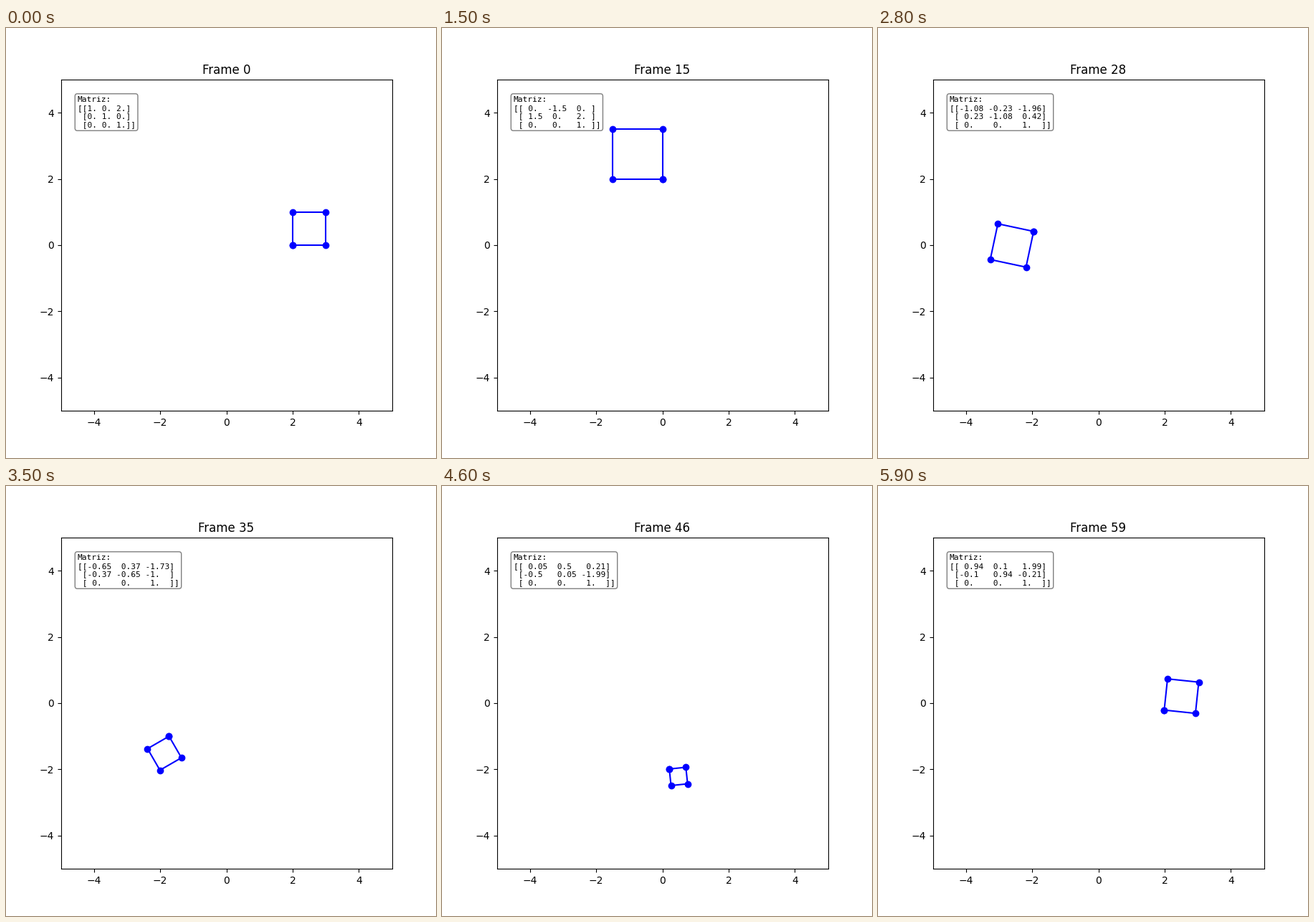
Write a matplotlib script that moves like this. It is 600 by 600 pixels and loops after 6000 ms.

```python
import numpy as np
import matplotlib.pyplot as plt
from matplotlib.animation import FuncAnimation

FRAMES = 60
INTERVAL = 100

# Closed unit square in homogeneous coordinates, one corner per column
SQUARE = np.array([
    [0, 1, 1, 0, 0],
    [0, 0, 1, 1, 0],
    [1, 1, 1, 1, 1],
])


def translation(tx, ty):
    return np.array([[1, 0, tx], [0, 1, ty], [0, 0, 1]], dtype=float)


def rotation(angle):
    c, s = np.cos(angle), np.sin(angle)
    return np.array([[c, -s, 0], [s, c, 0], [0, 0, 1]])


def scaling(k):
    return np.diag([k, k, 1.0])


def transform(frame):
    """Scale and spin the square while it orbits on a circle of radius 2."""
    angle = 2 * np.pi * frame / FRAMES
    shift = translation(2 * np.cos(angle), 2 * np.sin(angle))
    return shift @ rotation(angle) @ scaling(1 + 0.5 * np.sin(angle))


fig, ax = plt.subplots(figsize=(6, 6), dpi=100)
ax.set_xlim(-5, 5)
ax.set_ylim(-5, 5)
ax.set_aspect("equal")

outline, = ax.plot([], [], "o-", color="blue")
label = ax.text(
    0.05, 0.95, "", transform=ax.transAxes, va="top",
    fontsize=8, family="DejaVu Sans Mono",
    bbox=dict(boxstyle="round", facecolor="white", alpha=0.5),
)


def update(frame):
    matrix = transform(frame)
    x, y, _ = matrix @ SQUARE
    outline.set_data(x, y)
    label.set_text(f"Matriz:\n{np.round(matrix, 2)}")
    ax.set_title(f"Frame {frame}")
    return outline, label


anim = FuncAnimation(fig, update, frames=FRAMES, interval=INTERVAL,
                     repeat=True, repeat_delay=0)
plt.show()
```
